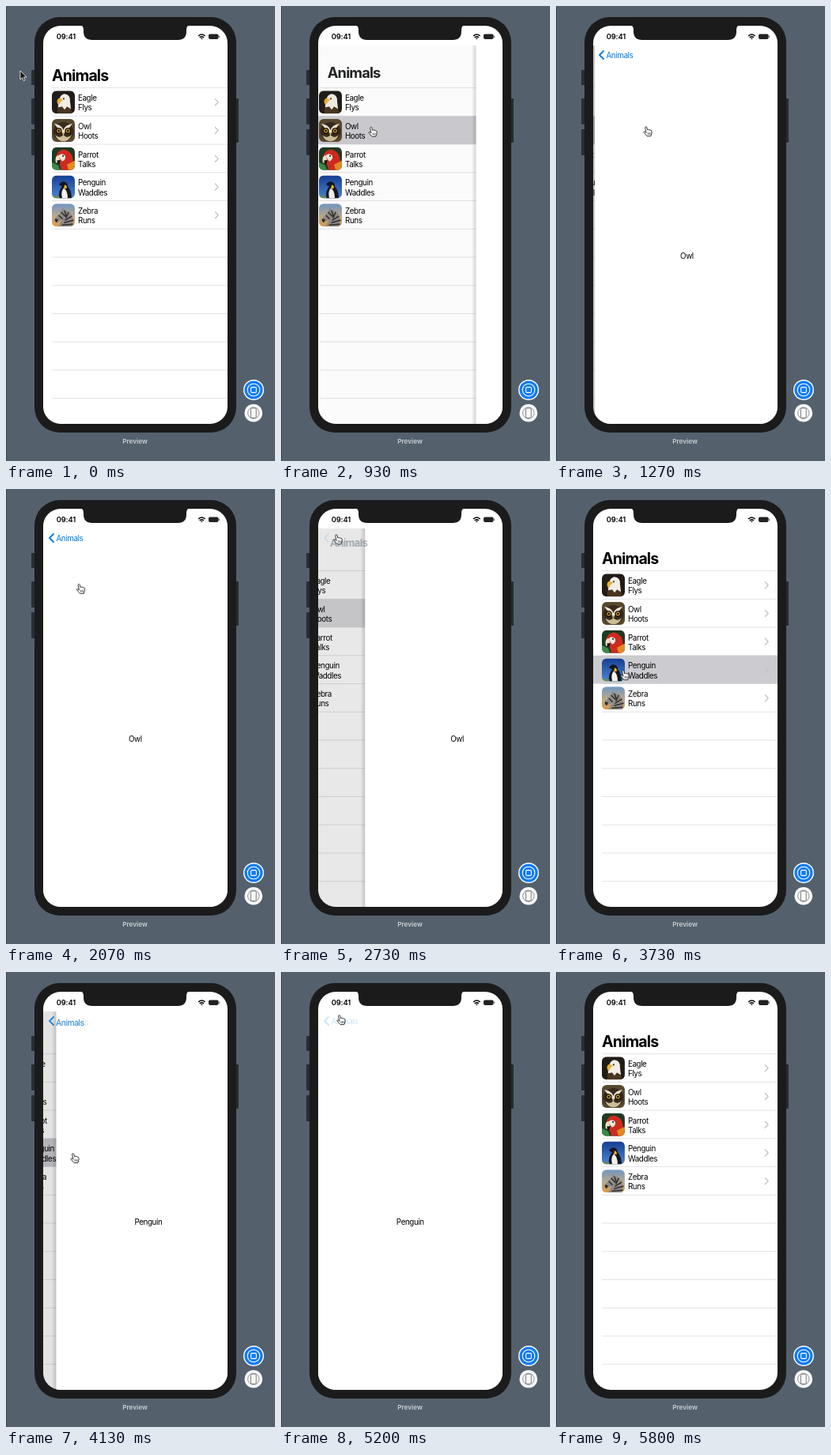
Recreate the animation shown at these times as an HTML page. Size 340x576 px, loop 6.07 s.

```html
<!DOCTYPE html>
<html lang="en">
<head>
<meta charset="utf-8">
<title>Animal list preview</title>
<style>
  html, body { margin: 0; width: 100%; height: 100%; overflow: hidden; background: #54616d; }
  svg { display: block; width: 340px; height: 576px; }
  text { font-family: Inter, Roboto, sans-serif; }
  .body { font-size: 9.8px; letter-spacing: -.4px; }
  .title { font-size: 19.5px; font-weight: 700; letter-spacing: -.85px; }
  .clock { font-size: 9.3px; font-weight: 600; letter-spacing: -.15px; }
  .caption { font-size: 8.2px; font-weight: 600; fill: #ccd1d6; }
  .mid { text-anchor: middle; }
  .blue { fill: #007ad8; }
  .line { fill: none; stroke-linecap: round; stroke-linejoin: round; }
</style>
</head>
<body>
<svg viewBox="0 0 340 576">
  <defs>
    <clipPath id="screen"><rect x="47" y="25" width="233" height="504" rx="22"/></clipPath>
    <clipPath id="thumb"><rect width="29" height="29" rx="6"/></clipPath>
    <linearGradient id="edge">
      <stop offset="0" stop-opacity="0"/>
      <stop offset="1" stop-opacity=".16"/>
    </linearGradient>
    <linearGradient id="dusk" x2="0" y2="1">
      <stop offset="0" stop-color="#7196c4"/>
      <stop offset=".55" stop-color="#b9a98c"/>
      <stop offset="1" stop-color="#dc9a48"/>
    </linearGradient>
    <linearGradient id="sky" x2="0" y2="1">
      <stop offset="0" stop-color="#173f94"/>
      <stop offset="1" stop-color="#4a86cf"/>
    </linearGradient>
  </defs>

  <rect width="340" height="576" fill="#54616d"/>
  <rect width="1" height="576" fill="#3d4851"/>

  <!-- phone -->
  <g fill="#282e34">
    <rect x="32" y="81" width="6" height="19" rx="1"/>
    <rect x="32" y="117" width="6" height="33" rx="1"/>
    <rect x="32" y="156" width="6" height="33" rx="1"/>
    <rect x="288" y="117" width="6" height="56" rx="1" fill="#252d2b"/>
  </g>
  <rect x="36" y="14" width="255" height="526" rx="32" fill="#1b1b1b"/>

  <g clip-path="url(#screen)">
    <rect x="47" y="25" width="233" height="504" fill="#fff"/>
    <g id="list">
      <rect id="highlight" x="47" width="233" height="35.7" fill="#cbcbd0"/>
    </g>
    <rect id="dim" x="47" y="50" width="233" height="479"/>
    <g id="detail">
      <rect id="shadow" x="41" y="50" width="6" height="479" fill="url(#edge)"/>
      <rect x="47" y="50" width="233" height="479" fill="#fff"/>
      <text id="name" class="body mid" x="163.3" y="320.3"></text>
    </g>
    <text id="title" class="title">Animals</text>
    <g id="back">
      <path id="arrow" class="line" d="M60 57l-5 5 5 5" stroke="#007ad8" stroke-width="1.8"/>
      <text id="label" class="body blue">Animals</text>
    </g>
  </g>

  <!-- notch and status bar -->
  <path d="M92 24q6 0 6 6v2q0 11 11 11h108q11 0 11-11v-2q0-6 6-6z" fill="#1b1b1b"/>
  <text class="clock" x="63.8" y="42.2">09:41</text>
  <g class="line" stroke="#000" stroke-width="1.4">
    <path d="M243.6 37.6q3.8-3.3 7.6 0M245.2 39.6q2.2-1.9 4.4 0"/>
    <circle cx="247.4" cy="41.2" r=".3"/>
  </g>
  <rect x="256" y="35.5" width="12.6" height="6.4" rx="1.8" fill="#222"/>
  <rect x="269.2" y="37.5" width="1" height="2.4" rx=".5" fill="#555"/>

  <text class="caption mid" x="163" y="554.2">Preview</text>

  <!-- preview controls -->
  <circle cx="313" cy="486" r="13" fill="#fff"/>
  <circle cx="313" cy="486" r="11.6" fill="#0f7bf5"/>
  <g fill="none" stroke="#fff" stroke-width="1.1">
    <circle cx="313" cy="486" r="7.8"/>
    <rect x="309.6" y="482.6" width="6.8" height="6.8" rx="1.4"/>
  </g>
  <circle cx="312.8" cy="515.2" r="11.3" fill="#fafafa"/>
  <g fill="none" stroke="#77797b">
    <circle cx="312.8" cy="515.2" r="7.2" stroke-width=".8"/>
    <rect x="309.4" y="509" width="6.8" height="12.4" rx="1.5" fill="#fafafa"/>
  </g>

  <g id="cursor">
    <path id="pointer" d="M0 0V11L2.6 8.7 4.4 12.7 6.2 11.9 4.4 8H8Z" fill="#111" stroke="#fff" stroke-width=".8"/>
    <g id="hand" class="line" stroke="#222" stroke-width=".9">
      <path fill="#fff" d="M2.6 1.6C2.6.3 4.5.2 4.8 1.6L5.6 4.8C6 3.9 7.3 4 7.5 4.9 8 4.2 9.2 4.4 9.3 5.3 10.2 4.9 11 5.5 11 6.5V8.8L9.8 12.6H5L1.2 8.2C.5 7.2 1.6 6.4 2.5 7.1L3.7 8Z"/>
      <path stroke-width=".6" d="M6 8.4v2.2M7.6 8.4v2.2M9.1 8.4v2.2"/>
    </g>
  </g>
</svg>

<script>
const $ = id => document.getElementById(id);
const set = (id, attrs) => {
  for (const key in attrs) $(id).setAttribute(key, attrs[key]);
};
const clamp = v => Math.max(0, Math.min(1, v));

const LOOP = 6070, STEP = 1000 / 15;
const TOP = 103.6, PITCH = 35.73, WIDTH = 233;

// Each row: name, action, picture in a 29 px square
const rows = [
  ['Eagle', 'Flys', `
    <rect width="29" height="29" fill="#211c17"/>
    <path d="M7 29Q6 20 9 14L22 17Q25 22 25 29Z" fill="#49351f"/>
    <path d="M8 21Q8 5 16 4Q24 5 23 14L24 23 19 20 16 24 13 20Z" fill="#f2eee6"/>
    <path d="M8 10Q12 8 14 12L11 14Q10 17 8 18Q5 13 8 10Z" fill="#e7b13a"/>
    <circle cx="15" cy="10" r="1.1" fill="#332a1c"/>`],
  ['Owl', 'Hoots', `
    <rect width="29" height="29" fill="#57492f"/>
    <ellipse cx="14.5" cy="16" rx="13" ry="12" fill="#382a1d"/>
    <path d="M3 6Q12 7 14.5 14Q17 7 26 6L22 11 14.5 19 7 11Z" fill="#e9e2cf"/>
    <path d="M4 20Q10 26 14.5 20Q19 26 25 20Q21 29 14.5 28Q8 29 4 20Z" fill="#cdbd98"/>
    <g fill="#d9a32c" stroke="#17110c" stroke-width="1.4">
      <circle cx="8.7" cy="15" r="3.2"/><circle cx="20.3" cy="15" r="3.2"/>
    </g>
    <circle cx="8.7" cy="15" r="1.3"/><circle cx="20.3" cy="15" r="1.3"/>
    <path d="M13 17h3l-1.5 5z" fill="#c8b270"/>`],
  ['Parrot', 'Talks', `
    <rect width="29" height="29" fill="#1f3a22"/>
    <path d="M0 29V19L8 23 10 29Z" fill="#3c8a45"/>
    <path d="M5 15Q6 3 16 3Q26 5 27 18L29 29H12Q11 21 5 15Z" fill="#cf2a1e"/>
    <path d="M8 11Q13 6 17 11Q18 16 13 18Z" fill="#f1e7d9"/>
    <path d="M8 10Q3 12 5 20L11 17Z" fill="#efe3c4"/>
    <path d="M6 17L11 16 9 22Z" fill="#151310"/>
    <circle cx="14" cy="11" r="1"/>
    <path d="M19 22L29 17V29H21Z" fill="#e08c23"/>`],
  ['Penguin', 'Waddles', `
    <rect width="29" height="29" fill="url(#sky)"/>
    <path d="M9 29Q8 19 13 14L9 11.5Q12 7 16 8Q20 9 20 14Q25 19 25 29Z" fill="#14171f"/>
    <path d="M13 29Q11 20 15 16Q20 19 20 29Z" fill="#f2f1ea"/>
    <path d="M16 12Q19 12 19 16L15 17Z" fill="#efb52f"/>
    <path d="M0 25L10 27 9 29H0Z" fill="#6c8a56"/>`],
  ['Zebra', 'Runs', `
    <rect width="29" height="29" fill="url(#dusk)"/>
    <path d="M8 29L13 20 6 24Q3 22 4 19L12 10 13 5 16 8Q24 9 27 20L26 29Z" fill="#8d8a86"/>
    <path class="line" d="M12 11l5 5M16 9l2 6M21 11l-3 7M25 16l-8 5M27 21l-11 3M26 26l-13 1M9 15l4 4" stroke="#302d2b" stroke-width="1.5"/>
    <path d="M4 19L8 20 6 24Q3 22 4 19Z" fill="#2c2825"/>`]
];

function buildList() {
  let html = '';
  for (let i = 0; i < 12; i++) {
    const y = TOP + i * PITCH;
    html += `<path d="M58 ${y}H280" stroke="#dcdcde" stroke-width=".8"/>`;
  }
  rows.forEach(([name, action, art], i) => {
    const y = TOP + i * PITCH;
    html += `<g transform="translate(58 ${y + 3.7})" clip-path="url(#thumb)">${art}</g>
      <text class="body" x="91" y="${y + 16.5}">${name}</text>
      <text class="body" x="91" y="${y + 28.8}">${action}</text>
      <path class="line" d="M264.4 ${y + 14.2}l3.8 4-3.8 4" stroke="#c4c4c7" stroke-width="1.3"/>`;
  });
  // The selected row hides the lines but stays under the text.
  const lines = html.split('<g transform')[0];
  $('list').insertAdjacentHTML('afterbegin', lines);
  $('list').insertAdjacentHTML('beforeend', html.slice(lines.length));
}

// Visits to a detail page: row, touch, push and pop times
const visits = [
  { row: 1, touch: 730, push: 897, press: 2530, pop: 2680 },
  { row: 3, touch: 3730, push: 3897, press: 5130, pop: 5285 }
];

// Critically damped spring from 0 to 1
function spring(ms) {
  const x = Math.max(0, ms) * .01826;
  return 1 - (1 + x) * Math.exp(-x);
}

// Cursor stops: time, x, y
const path = [
  [0, 18, 82], [70, 18, 82], [270, 45, 130], [400, 85, 182], [500, 108, 188],
  [670, 110, 153], [1400, 110, 152], [2000, 98, 154], [2070, 88, 118],
  [2130, 78, 85], [2270, 66, 58], [2730, 66, 57], [3000, 71, 73],
  [3130, 76, 120], [3270, 79, 190], [3400, 80, 222], [3530, 81, 229],
  [4380, 81, 229], [4530, 74, 165], [4730, 68, 82], [4870, 68, 82],
  [5070, 70, 54], [5470, 70, 54], [5700, 67, 12], [LOOP, 67, 12]
];

function cursorAt(t) {
  const i = path.findIndex(stop => stop[0] > t);
  const [t0, x0, y0] = path[i - 1], [t1, x1, y1] = path[i];
  const k = (t - t0) / (t1 - t0);
  return [x0 + (x1 - x0) * k, y0 + (y1 - y0) * k];
}

function draw(t) {
  const v = t < visits[1].touch ? visits[0] : visits[1];
  const p = t < v.pop ? spring(t - v.push) : 1 - spring(t - v.pop);
  const selected = t < v.touch ? 0 : t < v.pop ? 1 : p;

  set('highlight', { y: TOP + v.row * PITCH, opacity: selected });
  set('list', { transform: `translate(${-.3 * WIDTH * p} 0)` });
  set('dim', { opacity: .12 * p });
  set('detail', { transform: `translate(${WIDTH * (1 - p)} 0)` });
  set('shadow', { opacity: clamp(p * 8) });
  $('name').textContent = rows[v.row][0];

  // The large title shrinks into the back button.
  const place = `translate(${58 + 5.5 * p} ${95 - 29.2 * p})`;
  const pressed = t >= v.press && t < v.pop + 400;
  set('title', { transform: `${place} scale(${1 - .45 * p})`, opacity: 1 - p });
  set('label', { transform: `${place} scale(${1 + .8 * (1 - p)})` });
  set('back', { opacity: p * p * (pressed ? .2 : 1) });

  const [x, y] = cursorAt(t);
  const outside = x < 36;
  set('cursor', { transform: `translate(${x} ${y})`, opacity: t < 5760 ? 1 : 0 });
  set('pointer', { opacity: outside ? 1 : 0 });
  set('hand', { opacity: outside ? 0 : 1 });
}

buildList();
const start = performance.now();
function tick() {
  const t = (performance.now() - start) % LOOP;
  draw(Math.min(LOOP - 1, Math.floor((t + 5) / STEP) * STEP));
  requestAnimationFrame(tick);
}
tick();
</script>
</body>
</html>
```
